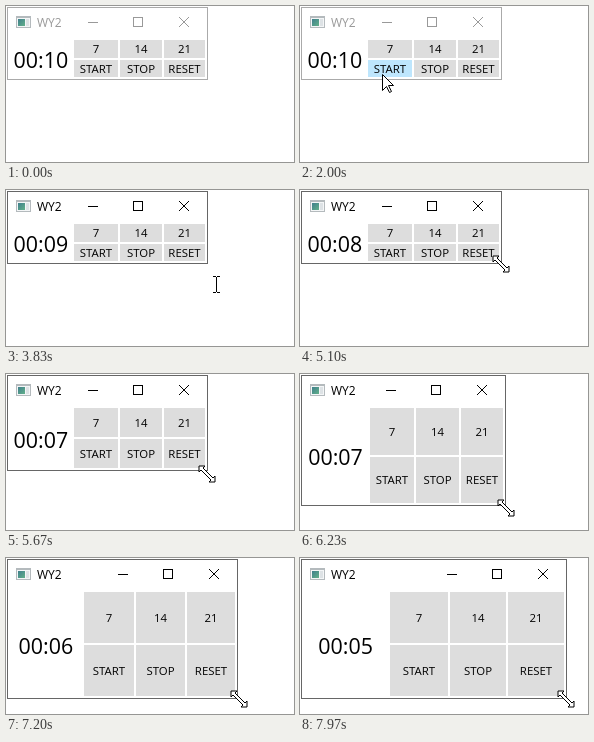
Recreate the animation shown at these times as an HTML page with a canvas. Size 288 px wide and 156 px high, loop 8 s.

```html
<!DOCTYPE html>
<html lang="en">
<head>
<meta charset="utf-8">
<title>Countdown window</title>
<style>
  html, body { margin: 0; width: 100%; height: 100%; overflow: hidden; background: #fff; }
  canvas { display: block; }
</style>
</head>
<body>
<canvas id="stage" width="288" height="156"></canvas>
<script>
const ctx = document.getElementById('stage').getContext('2d');
const LOOP = 8000, CLICK = 2400, FIRST_TICK = 3440, DRAG_START = 5000, DRAG_LAG = 50;
const FONT = '"Open Sans", "Noto Sans", sans-serif';

const ramp = (t, from, to) => Math.min(1, Math.max(0, (t - from) / (to - from)));
const ease = (t, from, to) => {
  const k = ramp(t, from, to);
  return k * k * (3 - 2 * k);
};

// Bottom right corner of the window: dragged down, then to the right
function cornerAt(t) {
  return {
    right: Math.round(201 + 5 * ease(t, 5700, 6400) + 60 * ramp(t, 6650, 7970)),
    bottom: Math.round(73 + 67 * ease(t, 5078, 6583))
  };
}

// The pointer leads the window slightly while dragging
function pointerAt(t) {
  if (t > DRAG_START) {
    const { right, bottom } = cornerAt(t + DRAG_LAG);
    return { x: right, y: bottom + 1 };
  }
  const approach = ramp(t, 880, 1970) ** 2;
  const leave = ease(t, 2500, 3420);
  const back = ease(t, 3650, 4170);
  return {
    x: Math.round(132 - 50 * approach + 131 * leave - 12 * back),
    y: Math.round(168 - 100 * approach + 34 * leave - 28 * back)
  };
}

function rect(color, x, y, w, h) {
  ctx.fillStyle = color;
  ctx.fillRect(x, y, w, h);
}

function text(value, x, y, size, color = '#000', align = 'center') {
  ctx.font = `${size}px ${FONT}`;
  ctx.textAlign = align;
  ctx.fillStyle = color;
  ctx.fillText(value, x, y);
}

function polygon(points, x, y) {
  ctx.beginPath();
  points.forEach(([dx, dy]) => ctx.lineTo(x + dx + .5, y + dy + .5));
  ctx.closePath();
  ctx.fillStyle = '#fff';
  ctx.strokeStyle = '#000';
  ctx.fill();
  ctx.stroke();
}

function drawTitleBar(right, color) {
  rect('#b4babd', 10, 10, 15, 12);
  rect('#f4f6f7', 11, 12, 13, 9);
  const green = ctx.createLinearGradient(12, 13, 19, 20);
  green.addColorStop(0, '#3f7f8c');
  green.addColorStop(1, '#62b08a');
  rect(green, 12, 13, 7, 7);
  rect('#dde2e5', 20, 13, 3, 7);
  text('WY2', 31, 21, 12, color, 'left');

  ctx.strokeStyle = color;
  rect(color, right - 119, 16, 10, 1);
  ctx.strokeRect(right - 73.5, 11.5, 9, 9);
  ctx.beginPath();
  ctx.moveTo(right - 28, 11);
  ctx.lineTo(right - 18, 21);
  ctx.moveTo(right - 18, 11);
  ctx.lineTo(right - 28, 21);
  ctx.stroke();
}

function drawWindow({ right, bottom }, pointer, active, seconds) {
  ctx.strokeStyle = active ? '#666' : '#aaa';
  ctx.strokeRect(1.5, 1.5, right - 1, bottom - 1);
  drawTitleBar(right, active ? '#000' : '#999');

  // Grid: one column of 1.5 shares and three of 1, two equal rows
  const left = 2.4, top = 33;
  const column = (right - 1 - left) / 4.5, row = (bottom - 1 - top) / 2;
  const edge = i => left + column * (1.5 + i);
  const time = '00:' + String(seconds).padStart(2, '0');
  text(time, left + column * .75 - .5, Math.round(top + row + 9.5), 21.4);

  [['7', '14', '21'], ['START', 'STOP', 'RESET']].forEach((labels, r) => {
    const y = Math.round(top + r * row) + 1;
    const h = Math.round(top + (r + 1) * row) - 1 - y;
    labels.forEach((label, c) => {
      const x = c ? Math.ceil(edge(c)) + 1 : Math.round(edge(c));
      const w = Math.ceil(edge(c + 1)) - 1 - x;
      const hover = pointer.x >= x && pointer.x < x + w && pointer.y >= y && pointer.y < y + h;
      rect(hover ? '#bee6fd' : '#ddd', x, y, w, h);
      text(label, x + w / 2, Math.round(y + h / 2 + 4), 11.4);
    });
  });
}

function drawPointer({ x, y }, { right, bottom }) {
  if (Math.hypot(x - right, y - bottom) < 8) {
    const half = [[-8, -8], [-2, -8], [-4, -6], [6, 4], [8, 2]];
    polygon([...half, ...half.map(([dx, dy]) => [-dx, -dy])], x - .5, y - .5);
  } else if (x <= right && y <= bottom) {
    polygon([[0, 0], [0, 16], [4, 12], [7, 18], [9, 17], [6, 11], [11, 11]], x, y);
  } else {
    rect('#000', x, y - 7, 1, 15);
    for (const end of [y - 8, y + 8]) {
      rect('#000', x - 3, end, 3, 1);
      rect('#000', x + 1, end, 3, 1);
    }
  }
}

function draw(t) {
  const corner = cornerAt(t), pointer = pointerAt(t);
  const ticks = Math.max(0, Math.floor((t - FIRST_TICK) / 1000) + 1);
  rect('#fff', 0, 0, 288, 156);
  drawWindow(corner, pointer, t >= CLICK, 10 - ticks);
  drawPointer(pointer, corner);
}

let start;
function frame(now) {
  start ??= now;
  draw((now - start) % LOOP);
  requestAnimationFrame(frame);
}
requestAnimationFrame(frame);
</script>
</body>
</html>
```
